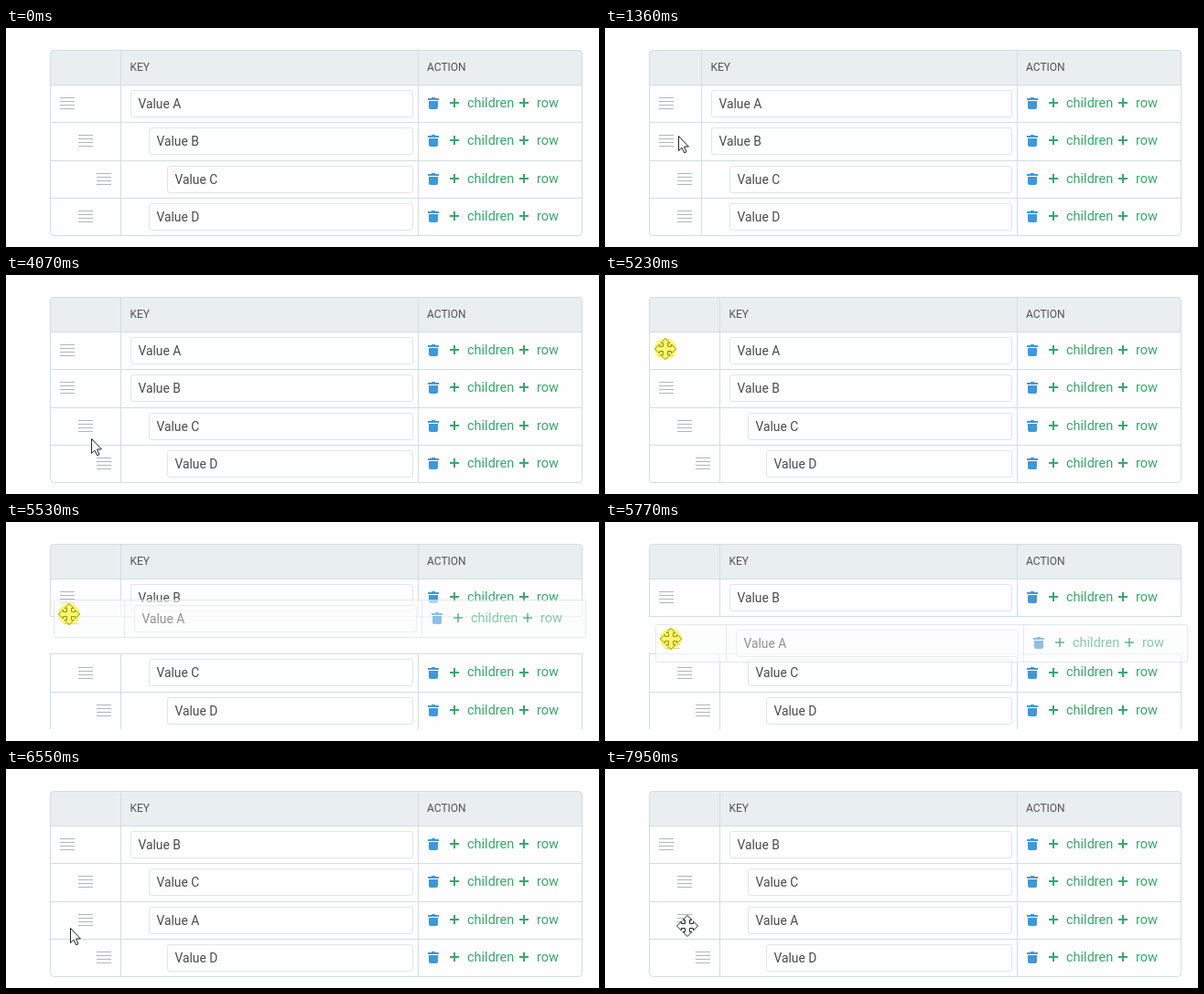
Animation of 648 by 240 pixels, one loop 8 s. Source, as an HTML page with a canvas:

```html
<!DOCTYPE html>
<html lang="en">
<head>
<meta charset="utf-8">
<title>Nested rows</title>
<style>
html, body { margin: 0; width: 648px; height: 240px; overflow: hidden; background: #fefefe; }
canvas { display: block; }
</style>
</head>
<body>
<canvas id="stage" width="648" height="240"></canvas>
<script>
const ctx = document.getElementById('stage').getContext('2d');
const LOOP = 8000, ROW = 41.34, TOP = 62, LEFT = 48, RIGHT = 629, ACTION = 450;
const FONT = '"Fira Sans", Roboto, "Noto Sans", sans-serif';
const LINE = '#d3dde0', PAGE = '#fefefe', GREEN = '#38a86b', BLUE = '#3f98d8';

// The pointer rests between moves: start time, end time, goal
const ENTER = { t: 500, x: 24, y: 148 };
const moves = [
  [500, 740, 92, 126],
  [860, 1010, 78, 127],
  [1120, 1240, 82, 124],
  [1300, 1660, 71, 91],
  [1850, 1960, 66, 84],
  [2140, 2690, 82, 162],
  [2690, 2990, 85, 204],
  [3230, 3650, 99, 212],
  [3830, 4070, 93, 179],
  [4070, 4870, 67, 82],
  [4870, 5230, 66, 81],
  [5350, 5770, 72, 128],
  [5770, 6130, 70, 174],
  [6550, 6850, 78, 242],
  [7170, 7650, 90, 172]
];
const GRAB = { x: 65, y: 78 };
const within = (t, a, b) => t >= a && t < b;

function cursorAt(t) {
  let { x, y } = ENTER;
  for (const [t0, t1, gx, gy] of moves) {
    const k = Math.max(0, Math.min(1, (t - t0) / (t1 - t0)));
    x += (gx - x) * k;
    y += (gy - y) * k;
  }
  return { x: Math.round(x), y: Math.round(y) };
}

function rowsAt(t) {
  if (t >= 6490) return [['B', 0], ['C', 1], ['A', 1], ['D', 2]];
  if (t < 980) return [['A', 0], ['B', 1], ['C', 2], ['D', 1]];
  return [['A', 0], ['B', 0], ['C', 1], ['D', t < 3590 ? 1 : 2]];
}

const rowTop = (slot, snap = Math.round) => snap(TOP + slot * ROW);

function rect(x, y, w, h, color) {
  ctx.fillStyle = color;
  ctx.fillRect(x, y, w, h);
}

function box(x, y, w, h, r, stroke, fill) {
  ctx.beginPath();
  ctx.roundRect(x + 0.5, y + 0.5, w - 1, h - 1, r);
  if (fill) { ctx.fillStyle = fill; ctx.fill(); }
  ctx.strokeStyle = stroke;
  ctx.lineWidth = 1;
  ctx.stroke();
}

function text(s, x, y, color, size) {
  ctx.font = `${size}px ${FONT}`;
  ctx.fillStyle = color;
  ctx.fillText(s, x, y);
}

function plus(x, y) {
  rect(x - 5, y - 1, 10, 2, GREEN);
  rect(x - 1, y - 5, 2, 10, GREEN);
}

function trash(x, y) {
  rect(x, y + 1, 12, 2, BLUE);
  rect(x + 4, y, 4, 1, BLUE);
  ctx.beginPath();
  ctx.roundRect(x + 1, y + 4, 10, 9, [0, 0, 2, 2]);
  ctx.fill();
}

function drawRow([name, level], y, col, iconY = y) {
  for (let i = 0; i < 4; i++) rect(59 + level * 20, iconY + 14 + i * 4, 16, 1, '#b2b5b7');
  const x = col + 11 + level * 20;
  box(x, y + 6, 445 - x, 30, 2.5, '#e0e5e8', PAGE);
  text('Value ' + name, x + 8.5, y + 26, '#4a4a4a', 13.8);
  trash(461, iconY + 14);
  plus(490, iconY + 20);
  text('children', 504, y + 25, GREEN, 14.5);
  plus(566, iconY + 20);
  text('row', 580, y + 25, GREEN, 14.5);
}

function drawHeader(col) {
  box(LEFT, 24, RIGHT - LEFT + 1, 39, [4, 4, 0, 0], LINE, '#e9eef1');
  rect(col, 24, 1, 38, LINE);
  rect(ACTION, 24, 1, 38, LINE);
  text('KEY', col + 10.5, 47, '#555', 12);
  text('ACTION', 460, 47, '#555', 12);
}

function shape(points, x, y) {
  ctx.beginPath();
  points.forEach(([px, py]) => ctx.lineTo(x + px, y + py));
  ctx.closePath();
  ctx.fillStyle = '#fff';
  ctx.fill();
  ctx.strokeStyle = '#222';
  ctx.lineWidth = 1;
  ctx.stroke();
}

const arrow = [[0.5, 0.5], [0.5, 16.5], [4, 13.2], [6.6, 18.8], [9, 17.7], [6.5, 12], [11.4, 12]];
const arm = [[-2.5, -2.5], [-2.5, -6.5], [-5, -6.5], [0, -11.5], [5, -6.5], [2.5, -6.5]];
const turn = ([x, y], q) => q ? turn([-y, x], q - 1) : [x, y];
const cross = [0, 1, 2, 3].flatMap(q => arm.map(p => turn(p, q)));

function drawCursor(c, rows, pressed) {
  const hover = rows.some(([, level], i) =>
    within(c.x, 58 + level * 20, 77 + level * 20) && within(c.y, rowTop(i) + 12, rowTop(i) + 29));
  shape(hover || pressed ? cross : arrow, c.x, c.y);
  if (!pressed) return;
  ctx.globalAlpha = 0.55;
  ctx.beginPath();
  ctx.arc(c.x, c.y, 11.8, 0, Math.PI * 2);
  ctx.fillStyle = '#fcf000';
  ctx.fill();
  ctx.globalAlpha = 1;
}

function draw(t) {
  rect(0, 0, 648, 240, PAGE);
  const rows = rowsAt(t), c = cursorAt(t);
  const col = 85 + 20 * Math.max(...rows.map(r => r[1]));
  const pressed = within(t, 800, 1060) || within(t, 3230, 3830) || within(t, 5110, 6490);
  const dragging = within(t, 5380, 6490);
  const snap = dragging ? Math.floor : Math.round;
  let held = null;
  if (dragging) {
    held = rows.shift();
    rows.splice(Math.round((c.y - GRAB.y) / ROW), 0, held);
  } else {
    box(LEFT, 24, RIGHT - LEFT + 1, 204, 4, LINE);
  }

  rows.forEach((row, i) => {
    const y = rowTop(i, snap), h = rowTop(i + 1, snap) - y;
    rect(LEFT, y, RIGHT - LEFT + 1, 1, LINE);
    if (row === held) return;
    for (const x of [col, ACTION]) rect(x, y, 1, h, LINE);
    if (dragging) for (const x of [LEFT, RIGHT]) rect(x, y, 1, h, LINE);
    drawRow(row, y, col, rowTop(i));
  });
  drawHeader(col);

  if (held) {
    ctx.save();
    ctx.globalAlpha = 0.6;
    ctx.translate(c.x - GRAB.x, c.y - GRAB.y);
    box(LEFT, TOP, RIGHT - LEFT + 1, 42, 2, LINE, PAGE);
    rect(col, TOP, 1, 41, LINE);
    rect(ACTION, TOP, 1, 41, LINE);
    drawRow(held, TOP, col);
    ctx.restore();
  }
  if (t >= ENTER.t) drawCursor(c, rows, pressed);
}

const start = performance.now();
function tick() {
  draw((performance.now() - start) % LOOP);
  requestAnimationFrame(tick);
}
tick();
</script>
</body>
</html>
```
